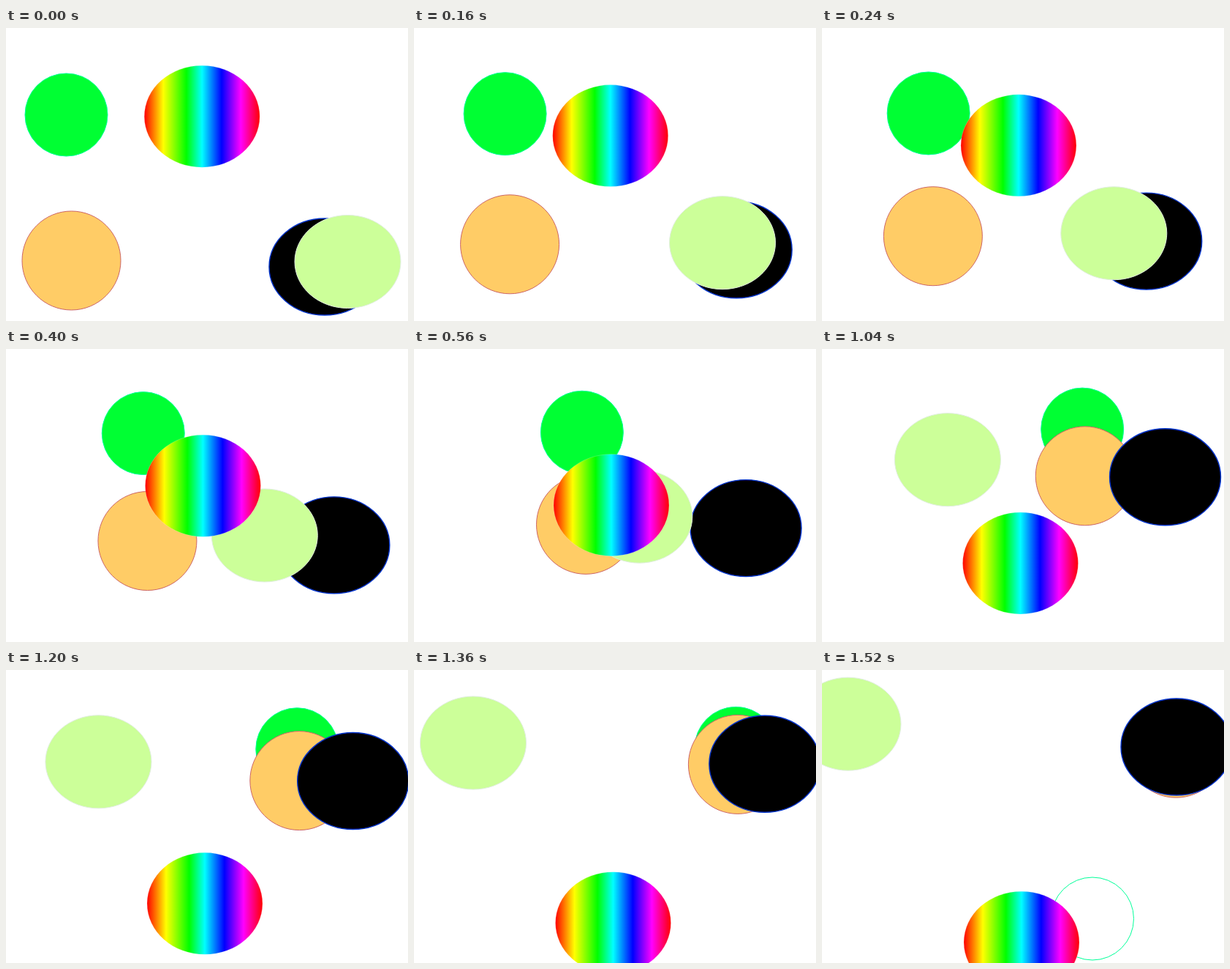
Recreate the animation shown at these times as an HTML page with a canvas. Size 550 by 400 pixels, loop 1600 ms.

```html
<!DOCTYPE html>
<html lang="en">
<head>
<meta charset="utf-8">
<title>Drifting circles</title>
<style>
  html, body { margin: 0; width: 100%; height: 100%; overflow: hidden; background: #fff; }
  canvas { display: block; }
</style>
</head>
<body>
<canvas id="stage" width="550" height="400"></canvas>
<script>
const ctx = document.getElementById("stage").getContext("2d");
const STEP_MS = 80;
const STEPS = 20;

// Back to front; each disc glides in a straight line during the loop.
const discs = [
  { from: [82.5, 118.5], to: [482.5, 105.5], rx: 56.5, ry: 56.5, fill: "#00ff33", line: "#00ff99" },
  { from: [89.5, 317.5], to: [484.5, 106.7], rx: 67.5, ry: 67.5, fill: "#ffcc66", line: "#cc6666" },
  { from: [436, 326], to: [485, 105], rx: 76, ry: 66, fill: "#000", line: "#0033cc", width: 1.4 },
  { from: [467.5, 319], to: [35.5, 73.7], rx: 72.5, ry: 63.5, fill: "#ccff99", line: "#dfeedd" },
  { from: [268.2, 120.7], to: [273, 371.7], rx: 79, ry: 69.5, fill: rainbow(79), line: "rgba(255, 255, 255, 0.2)" }
];
const ring = { rx: 56.5, ry: 56.5, line: "#00ff99" };

function rainbow(radius) {
  const gradient = ctx.createLinearGradient(-radius, 0, radius, 0);
  const stops = [[0, "#f00"], [0.165, "#ff0"], [0.365, "#0f0"], [0.5, "#0ff"],
                 [0.67, "#00f"], [0.835, "#f0f"], [1, "#f00"]];
  for (const [offset, color] of stops) gradient.addColorStop(offset, color);
  return gradient;
}

function drawDisc({ rx, ry, fill, line, width = 1 }, x, y) {
  ctx.save();
  ctx.translate(x, y);
  ctx.beginPath();
  ctx.ellipse(0, 0, rx, ry, 0, 0, Math.PI * 2);
  if (fill) {
    ctx.fillStyle = fill;
    ctx.fill();
  }
  ctx.strokeStyle = line;
  ctx.lineWidth = width;
  ctx.stroke();
  ctx.restore();
}

function draw(now) {
  const step = Math.floor(now / STEP_MS) % STEPS;
  const t = step / (STEPS - 1);
  ctx.fillStyle = "#fff";
  ctx.fillRect(0, 0, 550, 400);
  // The empty ring flashes up only at the very end.
  if (step === STEPS - 1) drawDisc(ring, 370, 339.5);
  for (const disc of discs) {
    const [x, y] = disc.from.map((start, i) => start + (disc.to[i] - start) * t);
    drawDisc(disc, x, y);
  }
}

const start = performance.now();
function tick() {
  draw(performance.now() - start);
  requestAnimationFrame(tick);
}
tick();
</script>
</body>
</html>
```
